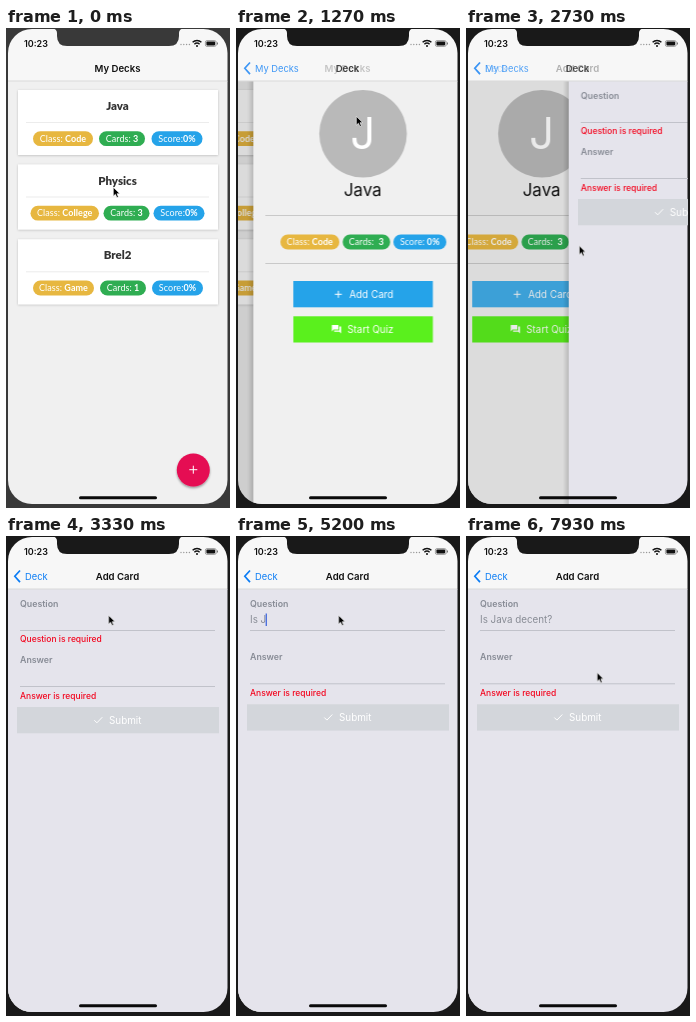
These frames come from a looping animation (224 px wide and 480 px high, 8 s). An HTML page:

```html
<!DOCTYPE html>
<html lang="en">
<head>
<meta charset="utf-8">
<title>Flashcard decks</title>
<style>
html, body { margin: 0; width: 100%; height: 100%; overflow: hidden; background: #191919; }
svg { display: block; width: 224px; height: 480px; font-family: Inter, sans-serif; }
text { white-space: pre; }
.mid { text-anchor: middle; }
.medium { font-weight: 500; }
.semi { font-weight: 600; }
.pill, .name { font-family: Lato, sans-serif; }
.pill { font-size: 9px; fill: #fff; letter-spacing: .05px; }
.pill tspan { font-weight: 700; }
.name { font-size: 11.5px; font-weight: 900; fill: #333; }

.anim, .bezel { animation: 8s linear infinite both; }
.bezel { animation-name: bezel; }
#list { animation-name: listSlide; }
#deck { animation-name: deckSlide; }
#form { animation-name: formSlide; }
#dim1 { animation-name: dimList; }
#dim2 { animation-name: dimDeck; }
#head1 { animation-name: head1; }
#head2 { animation-name: head2; }
#head3 { animation-name: head3; }
#add { animation-name: press; }
#warn { animation-name: warn; }
#lower { animation-name: lower; }
#cursor { animation-name: cursor; }

/* Waiting pages stay far enough right to hide their edge shadow */
@keyframes bezel { 0%, 9.1% { fill: #393939; } 13%, 100% { fill: #191919; } }
@keyframes listSlide {
  0%, 13.15% { transform: translateX(0); animation-timing-function: cubic-bezier(.2833, .99, .3183, .99); }
  19.4%, 100% { transform: translateX(-66px); }
}
@keyframes deckSlide {
  0%, 13.14% { transform: translateX(230px); }
  13.15% { transform: translateX(220px); animation-timing-function: cubic-bezier(.2833, .99, .3183, .99); }
  19.4% { transform: translateX(0); }
  33.085% { transform: translateX(0); animation-timing-function: cubic-bezier(.2833, .99, .3183, .99); }
  39.335%, 100% { transform: translateX(-66px); }
}
@keyframes formSlide {
  0%, 33.08% { transform: translateX(230px); }
  33.085% { transform: translateX(220px); animation-timing-function: cubic-bezier(.2833, .99, .3183, .99); }
  39.335%, 100% { transform: translateX(0); }
}
@keyframes dimList {
  0%, 13.15% { opacity: 0; animation-timing-function: cubic-bezier(.2833, .99, .3183, .99); }
  19.4%, 100% { opacity: .15; }
}
@keyframes dimDeck {
  0%, 33.085% { opacity: 0; animation-timing-function: cubic-bezier(.2833, .99, .3183, .99); }
  39.335%, 100% { opacity: .15; }
}
@keyframes head1 { 0%, 13.15% { opacity: 1; } 16.65%, 100% { opacity: 0; } }
@keyframes head2 { 0%, 13.15% { opacity: 0; } 16.65%, 33.085% { opacity: 1; } 36.6%, 100% { opacity: 0; } }
@keyframes head3 { 0%, 33.085% { opacity: 0; } 36.6%, 100% { opacity: 1; } }
@keyframes press { 0%, 31.6% { opacity: 1; } 33%, 34.2% { opacity: .86; } 36.5%, 100% { opacity: 1; } }
@keyframes warn { 0%, 59.12% { opacity: 1; } 59.125%, 100% { opacity: 0; } }
@keyframes lower { 0%, 59.12% { transform: translateY(0); } 59.125%, 100% { transform: translateY(-2.7px); } }
@keyframes cursor {
  0%, .9% { transform: translate(107px, 159px); animation-timing-function: ease-in-out; }
  6.6%, 20% { transform: translate(120px, 88px); animation-timing-function: ease-in-out; }
  24.1% { transform: translate(142px, 244px); }
  30%, 31.6% { transform: translate(114px, 264px); }
  34.1% { transform: translate(113px, 218.7px); animation-timing-function: ease-out; }
  41%, 93.1% { transform: translate(102.2px, 79px); animation-timing-function: ease-in-out; }
  96.6%, 98.2% { transform: translate(129px, 150px); }
  99.1%, 100% { transform: translate(130.8px, 136.3px); }
}
</style>
</head>
<body>
<svg id="stage" viewBox="0 0 224 480"></svg>
<script>
const GOLD = '#e7b740', GREEN = '#2fad52', BLUE = '#25a3e9', TINT = '#0a7cf5', RED = '#f3061f';
const LABEL = '#878b95', RULE = '#c1c2ca';

const rect = (x, y, w, h, fill, more = '') =>
  `<rect x="${x}" y="${y}" width="${w}" height="${h}" fill="${fill}" ${more}/>`;
const text = (x, y, size, fill, str, cls = '', more = '') =>
  `<text x="${x}" y="${y}" font-size="${size}" fill="${fill}" class="${cls}" ${more}>${str}</text>`;
const line = (x1, x2, y, color) => rect(x1, y, x2 - x1, 1, color);
const stroke = (d, color, width) =>
  `<path d="${d}" fill="none" stroke="${color}" stroke-width="${width}"/>`;
const group = (id, body) => `<g id="${id}" class="anim">${body}</g>`;
const pill = (x, y, w, color, label, value) =>
  rect(x, y, w, 14.8, color, 'rx="7.4"') +
  `<text class="pill mid" x="${x + w / 2}" y="${y + 10.6}">${label}<tspan>${value}</tspan></text>`;

// Row of a deck: pills are given as [x, width] pairs
const card = (y, name, kind, count, [a, b, c]) =>
  rect(12, y, 200, 65, '#fff', 'filter="url(#soft)"') +
  `<text class="name mid" x="111.5" y="${y + 20}">${name}</text>` +
  line(20, 203, y + 32, '#ececec') +
  pill(a[0], y + 41.3, a[1], GOLD, 'Class: ', kind) +
  pill(b[0], y + 41.3, b[1], GREEN, 'Cards: ', count) +
  pill(c[0], y + 41.3, c[1], BLUE, 'Score:', '0%');

const page = (id, fill, body) =>
  group(id, rect(-4, 53, 6, 424, 'url(#edge)') + rect(2, 53, 220, 424, fill) + body);
const dim = id => rect(2, 53, 220, 424, '#000', `id="${id}" class="anim"`);

const head = (id, title, back) => group(id,
  text(111.5, 43.6, 9.6, '#111', title, 'mid semi') +
  (back ? stroke('M14 34.5L8.8 40.3L14 46.1', TINT, 1.7) + text(19, 43.6, 9.3, TINT, back) : ''));

const listPage = page('list', '#f0f0f0',
  card(62, 'Java', 'Code', 3, [[27, 60], [93, 46], [145.5, 51]]) +
  card(136.5, 'Physics', 'College', 3, [[24.5, 68.5], [97.5, 46], [147.5, 51]]) +
  card(211.3, 'Brel2', 'Game', 1, [[27, 61], [94, 46], [146, 51]]) +
  '<circle cx="187.3" cy="442" r="16.5" fill="#e50b52" filter="url(#drop)"/>' +
  stroke('M183.3 441.7h8M187.3 437.7v8', '#fff', 1));

const deckPage = page('deck', '#f0f0f0',
  '<circle cx="111.7" cy="105.7" r="43.8" fill="#b9b9b9"/>' +
  text(111.5, 121.3, 43.5, '#fff', 'J', 'mid') +
  text(111.4, 168, 17, '#111', 'Java', 'mid') +
  line(14, 211, 187, '#c9c9c9') + line(14, 211, 235, '#c9c9c9') +
  pill(29, 206.6, 59, GOLD, 'Class: ', 'Code') +
  pill(91.3, 206.6, 47.5, GREEN, 'Cards:  ', '3') +
  pill(142, 206.6, 53, BLUE, 'Score: ', '0%') +
  group('add', rect(42, 253, 139.5, 26.3, BLUE) + stroke('M83.5 266.3h7M87 262.8v7', '#fff', 1) +
    text(98, 269.8, 9.9, '#fff', 'Add Card')) +
  rect(42, 288.3, 139.5, 26.2, '#5af01d') +
  '<path d="M80.5 297h6.6v4.6h-4.8l-1.8 1.8zM88 298.6h1.8v7l-1.8-1.8h-5.2v-1.4H88z" fill="#fff"/>' +
  text(96, 305, 9.9, '#fff', 'Start Quiz'));

const formPage = page('form', '#e5e4ec',
  text(14, 70.5, 8.8, LABEL, 'Question', 'semi') +
  line(14, 209, 94, RULE) +
  text(14, 87.2, 9.8, '#888c95', '', '', 'id="answer"') +
  rect(14, 77.5, 1.2, 12.5, '#3560dc', 'id="caret"') +
  group('warn', text(14, 106.4, 8.5, RED, 'Question is required', 'medium')) +
  group('lower',
    text(14, 126.6, 8.8, LABEL, 'Answer', 'semi') +
    line(14, 209, 150, RULE) +
    text(14, 162.5, 8.5, RED, 'Answer is required', 'medium') +
    rect(11, 171, 202, 26.3, '#d3d6db') +
    stroke('M88.3 184.2l2.6 2.6l5.4-5.6', '#fff', 1) +
    text(103, 187.7, 9.9, '#fff', 'Submit')));

const status =
  text(18, 18.6, 9, '#111', '10:23', 'semi') +
  [0, 1, 2, 3].map(i => `<circle cx="${175 + i * 2.8}" cy="16.5" r=".7" fill="#999"/>`).join('') +
  stroke('M186.6 14.2a6.4 6.4 0 0 1 8.8 0M188.4 16.2a3.8 3.8 0 0 1 5.2 0', '#111', 1.4) +
  '<circle cx="191" cy="18" r="1" fill="#111"/>' +
  rect(199.4, 12.6, 10.8, 5.8, 'none', 'rx="1.6" stroke="#777" stroke-width=".7"') +
  rect(200.4, 13.6, 8.8, 3.8, '#111', 'rx=".8"') + rect(211, 14.5, 1, 2, '#777');

document.getElementById('stage').innerHTML = `
  <defs>
    <clipPath id="screen"><rect x="2" y="1" width="219.5" height="475" rx="24"/></clipPath>
    <linearGradient id="edge"><stop offset="0" stop-opacity="0"/><stop offset="1" stop-opacity=".16"/></linearGradient>
    <filter id="soft" x="-5%" y="-10%" width="110%" height="125%">
      <feDropShadow dx="0" dy=".6" stdDeviation=".9" flood-opacity=".22"/></filter>
    <filter id="drop" x="-30%" y="-30%" width="160%" height="170%">
      <feDropShadow dx="0" dy="1.5" stdDeviation="1.3" flood-opacity=".4"/></filter>
  </defs>
  ${rect(0, 0, 224, 480, '#191919', 'class="bezel"')}
  <g clip-path="url(#screen)">
    ${listPage}${dim('dim1')}${deckPage}${dim('dim2')}${formPage}
    ${rect(2, 0, 220, 53, '#f7f7f7')}${line(2, 222, 52.5, '#d9d9d9')}
    ${head('head1', 'My Decks')}${head('head2', 'Deck', 'My Decks')}${head('head3', 'Add Card', 'Deck')}
    ${status}
    ${rect(73, 468.3, 78, 3, '#0a0a0a', 'rx="1.5"')}
  </g>
  <path class="bezel" d="M46 0Q51 1 51 5V8Q51 18 61 18H163Q173 18 173 8V5Q173 1 178 0Z"/>
  <g id="cursor" class="anim">
    <path d="M.3 .3V9.2L2.4 7.3L3.9 10.6L5.4 9.9L4 6.7H6.8Z" fill="#000" stroke="#fff" stroke-width=".6"/>
  </g>`;

const phrase = 'Is Java decent?';
const keys = [4730, 4870, 5000, 5170, 5270, 5470, 5530, 5600, 5930, 6270, 6400, 6470, 6600, 6730, 6930];
const answer = document.getElementById('answer');
const caret = document.getElementById('caret');
const clock = document.getElementById('cursor').getAnimations()[0];
let shown = -1;

function draw() {
  const t = (clock.currentTime || 0) % 8000;
  const count = keys.filter(k => k <= t).length;
  if (count !== shown) {
    shown = count;
    answer.textContent = phrase.slice(0, count).replace(/ /g, '\u00a0');
    caret.setAttribute('x', 13.5 + (count ? answer.getComputedTextLength() : 0));
  }
  const on = t >= 3500 && t < 7470 && !(t >= 4070 && t < 4470);
  caret.setAttribute('opacity', on ? 1 : 0);
  requestAnimationFrame(draw);
}
draw();
</script>
</body>
</html>
```
